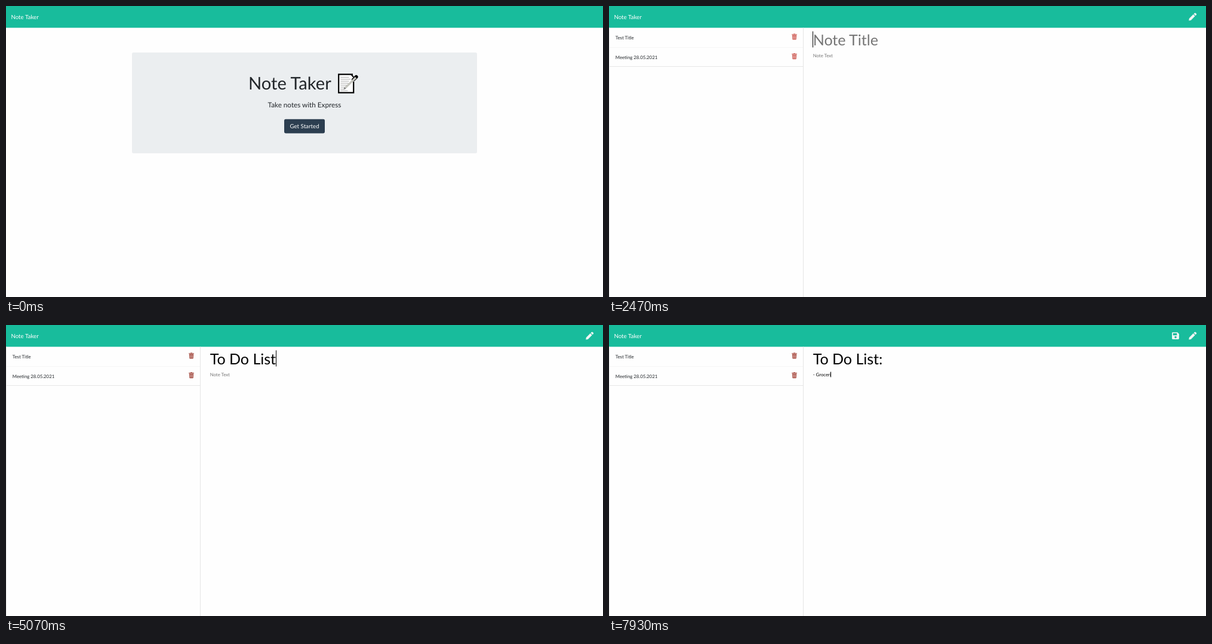
Write an HTML page that moves like this. It is 1000 px wide and 488 px high and loops after 8 s.

```html
<!DOCTYPE html>
<html lang="en">
<head>
<meta charset="utf-8">
<title>Note Taker</title>
<style>
  html, body { margin: 0; width: 100%; height: 100%; overflow: hidden; background: #fefefe; }
  svg { display: block; width: 100%; height: 100%; }
  text { font-family: Lato, sans-serif; fill: #212529; white-space: pre; text-rendering: geometricPrecision; }
  .small { font-size: 7.81px; }
  .medium { font-size: 9.76px; }
  .title { font-size: 25px; }
  .light { fill: #fff; }
  .icon { fill: #f0f5f4; }
  .line { stroke: #e6e6e6; fill: none; }
</style>
</head>
<body>
<svg viewBox="0 0 1000 488">
  <defs>
    <g id="trash">
      <path d="M.2 .8h2.6l.5-.8h2.4l.5.8h2.6v1.2H.2z"/>
      <path fill-rule="evenodd" d="M.8 2.6h7.4l-.4 6.5q-.1.9-1 .9H2.2q-.9 0-1-.9zM2.4 3.8v5h.6v-5zM4.2 3.8v5h.6v-5zM6 3.8v5h.6v-5z"/>
    </g>
  </defs>

  <rect width="1000" height="36.5" fill="#18bc9c"/>
  <text class="medium light" x="8.4" y="21.6">Note Taker</text>

  <g id="home">
    <rect x="211" y="78" width="578" height="169" rx="2.5" fill="#ebeef0"/>
    <text x="406" y="140" font-size="29.16">Note Taker</text>
    <g fill="none" stroke="#000" stroke-width="2.2">
      <path d="M581 114.6H557.2V145.4H582.2V127" fill="#fff"/>
      <path d="M560.5 119.5h14M560.5 122.8h17M560.5 126.1h14M560.5 129.4h13M560.5 132.7h11M560.5 136h8M560.5 139.3h6M560.5 142h12" stroke="#aaa" stroke-width="1"/>
      <path d="M578 114.6l4 4.4" stroke-width="2"/>
      <path d="M582 123.5l4.6-4.6" stroke-width="6" stroke-linecap="round"/>
      <path id="pencilBody" d="M568.5 137l17.5-17" stroke-width="3.4"/>
      <path d="M565.6 140l1.3-4 2.8 2.8z" fill="#777" stroke="none"/>
    </g>
    <text x="500" y="170.2" font-size="11.72" text-anchor="middle">Take notes with Express</text>
    <rect id="ring" x="464.6" y="188.4" width="70.8" height="26.4" rx="3.4" fill="#2c3e50"/>
    <rect id="button" x="466" y="189.8" width="68" height="23.6" rx="2.4"/>
    <text class="medium light" x="500" y="205.1" text-anchor="middle">Get Started</text>
  </g>

  <g id="notes">
    <path class="line" d="M.5 36.5V488M325.5 36.5V488"/>
    <g id="list">
      <path class="line" d="M1 69.5H325" stroke-opacity=".4"/>
      <path class="line" d="M1 101.5H325"/>
      <text class="small" x="10.8" y="55.7">Test Title</text>
      <text class="small" x="10.8" y="88.5">Meeting 28.05.2021</text>
      <g id="bins">
        <use href="#trash" x="306" y="46.5"/>
        <use href="#trash" x="306" y="79.2"/>
      </g>
    </g>
    <path id="save" class="icon" fill-rule="evenodd" d="M944.4 12.2h7.8l2.7 2.7v7.7q0 1.4-1.4 1.4h-9.1q-1.4 0-1.4-1.4v-9q0-1.4 1.4-1.4zM944.7 13.8v3.4h6.6v-3.4zM949 18.7a1.75 1.75 0 1 0 .01 0z"/>
    <path id="edit" class="icon" d="M971.2 24.5l.6-3.6 6.9-6.9 3 3-6.9 6.9zM979.4 13.3l1.4-1.4q.9-.8 1.8 0l1.2 1.2q.9.9 0 1.8l-1.4 1.4z"/>
    <text id="title" class="title" x="341.7" y="65.6"></text>
    <text id="body" class="small" x="341.7" y="85.7"></text>
    <rect id="caret" width="1"/>
  </g>
</svg>
<script>
const LOOP = 8000;
const PLACEHOLDER = '#757575';
const LEFT = 341.7;

const el = id => document.getElementById(id);
const show = (id, on) => { el(id).style.display = on ? '' : 'none'; };

// Value of the last step that has started.
const at = (steps, t) => steps.reduce((value, [start, next]) => t >= start ? next : value, steps[0][1]);

// Number of keys pressed so far.
const typed = (text, keys, t) => text.slice(0, keys.filter(k => k <= t).length);

const titleKeys = [3380, 3640, 3770, 3900, 4160, 4290, 4550, 4680, 4810, 5070, 5850];
const bodyKeys = [6760, 6890, 7020, 7280, 7410, 7540, 7670, 7800, 7930];

const buttonFill = [[0, '#2c3e50'], [260, '#25343f'], [390, '#1e2b37']];
const ringOpacity = [[0, 0], [520, .3], [650, .55]];
const pencilFill = [[0, '#c4c4bd'], [260, '#e5bd72']];
const binFill = [[0, '#cf5f58'], [3640, '#b4544b'], [4550, '#a34a40'], [6370, '#96594e'], [6760, '#a94c42']];
const caretFill = [[0, 'none'], [2470, '#000'], [2990, 'none'], [3380, '#bbb'], [3640, '#000'],
  [5590, 'none'], [5850, '#000'], [6370, 'none'], [6760, '#000']];

function write(id, text, placeholder) {
  const node = el(id);
  const value = text || placeholder;
  if (node.textContent !== value) node.textContent = value;
  node.style.fill = text ? '#000' : PLACEHOLDER;
}

function placeCaret(id, text, y, height, t) {
  const offset = text ? el(id).getComputedTextLength() : 0;
  const caret = el('caret');
  caret.setAttribute('x', Math.round(LEFT + offset - .4));
  caret.setAttribute('y', y);
  caret.setAttribute('height', height);
  caret.setAttribute('fill', at(caretFill, t));
}

function draw(t) {
  const onHome = t < 910;
  show('home', onHome);
  show('notes', !onHome);
  if (onHome) {
    el('button').setAttribute('fill', at(buttonFill, t));
    el('ring').setAttribute('opacity', at(ringOpacity, t));
    el('pencilBody').setAttribute('stroke', at(pencilFill, t));
    return;
  }
  const title = typed('To Do List:', titleKeys, t);
  const body = typed('- Groceri', bodyKeys, t);
  show('edit', t >= 1300);
  show('list', t >= 1690);
  show('save', body);
  el('bins').setAttribute('fill', at(binFill, t));
  write('title', title, 'Note Title');
  write('body', body, 'Note Text');
  if (body) placeCaret('body', body, 78.5, 9, t);
  else placeCaret('title', title, 42.5, 27, t);
}

const begin = performance.now();
function tick() {
  draw((performance.now() - begin) % LOOP);
  requestAnimationFrame(tick);
}
tick();
</script>
</body>
</html>
```
